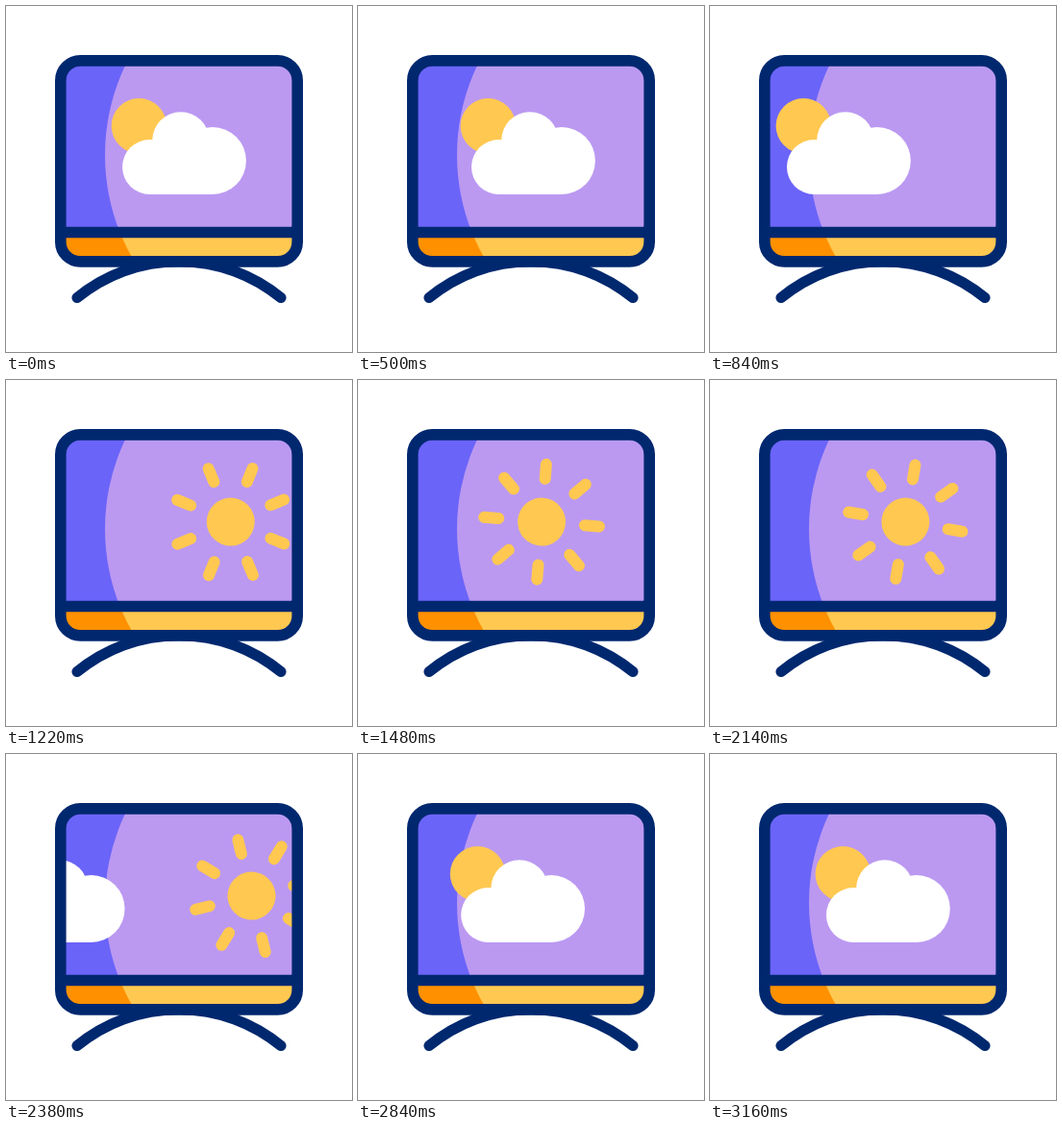
Animation of 360x360 px, one loop 3180 ms. Source, as an HTML page:

```html
<!DOCTYPE html>
<html lang="en">
<head>
<meta charset="utf-8">
<title>Weather on TV</title>
<style>
  html, body { margin: 0; width: 100%; height: 100%; overflow: hidden; background: #fff; }
  svg { display: block; width: 100vw; height: 100vh; }
</style>
</head>
<body>
<svg viewBox="0 0 360 360">
  <defs>
    <clipPath id="case"><rect x="57" y="57" width="246" height="209" rx="20"/></clipPath>
    <clipPath id="screen"><rect x="57" y="57" width="246" height="178" rx="20"/></clipPath>
  </defs>

  <g clip-path="url(#case)">
    <rect x="57" y="57" width="246" height="179" fill="#6b64f9"/>
    <rect x="57" y="235" width="246" height="32" fill="#ff9000"/>
    <g clip-path="url(#screen)"><circle cx="319" cy="155" r="216" fill="#bb99f1"/></g>
    <clipPath id="strip"><rect x="57" y="235" width="246" height="32"/></clipPath>
    <g clip-path="url(#strip)"><circle cx="319" cy="155" r="216" fill="#ffc850"/></g>
  </g>

  <g clip-path="url(#screen)">
    <g id="sun" fill="#ffc850" stroke="#ffc850" stroke-width="12" stroke-linecap="round">
      <circle r="25" stroke="none"/>
    </g>
    <g id="cloud">
      <circle cx="138.5" cy="124.7" r="28.7" fill="#ffc850"/>
      <g fill="#fff">
        <circle cx="149.7" cy="167.5" r="28.5"/>
        <circle cx="182" cy="139.8" r="29.6"/>
        <circle cx="215" cy="161" r="35"/>
        <rect x="149.7" y="150" width="65.3" height="46"/>
      </g>
    </g>
  </g>

  <g fill="none" stroke="#00286f" stroke-width="11.6" stroke-linecap="round">
    <rect x="56.8" y="56.9" width="246.4" height="209" rx="20.5"/>
    <path d="M57 235.5H303" stroke-linecap="butt"/>
    <path d="M74 303.5A167 167 0 0 1 286 303.5" stroke-width="11.2"/>
  </g>
</svg>
<script>
  const LOOP = 3180;
  const SUN_REST = 1760;
  const sun = document.getElementById('sun');
  const cloud = document.getElementById('cloud');

  for (let i = 0; i < 8; i++) {
    const ray = document.createElementNS('http://www.w3.org/2000/svg', 'path');
    ray.setAttribute('d', 'M45 0H60');
    ray.setAttribute('transform', `rotate(${i * 45})`);
    sun.append(ray);
  }

  // Power curve through (span, distance), zero before the motion starts.
  const ease = (elapsed, span, distance, power) =>
    distance * Math.pow(Math.max(0, elapsed) / span, power);

  function cloudShift(t) {
    if (t < 90) return -ease(90 - t, 430, 14.1, 3.02);
    if (t < SUN_REST) return -ease(t - 200, 640, 41, 3.4);
    return -ease(LOOP + 90 - t, 430, 14.1, 3.02);
  }

  function draw(t) {
    const roll = ease(Math.abs(t - SUN_REST), 540, 54, 2.4);
    sun.setAttribute('transform', `translate(${180 + roll} 147.6) rotate(${roll / 2.41})`);
    cloud.setAttribute('transform', `translate(${cloudShift(t)} 0)`);
  }

  function tick() {
    draw(performance.now() % LOOP);
    requestAnimationFrame(tick);
  }
  tick();
</script>
</body>
</html>
```
